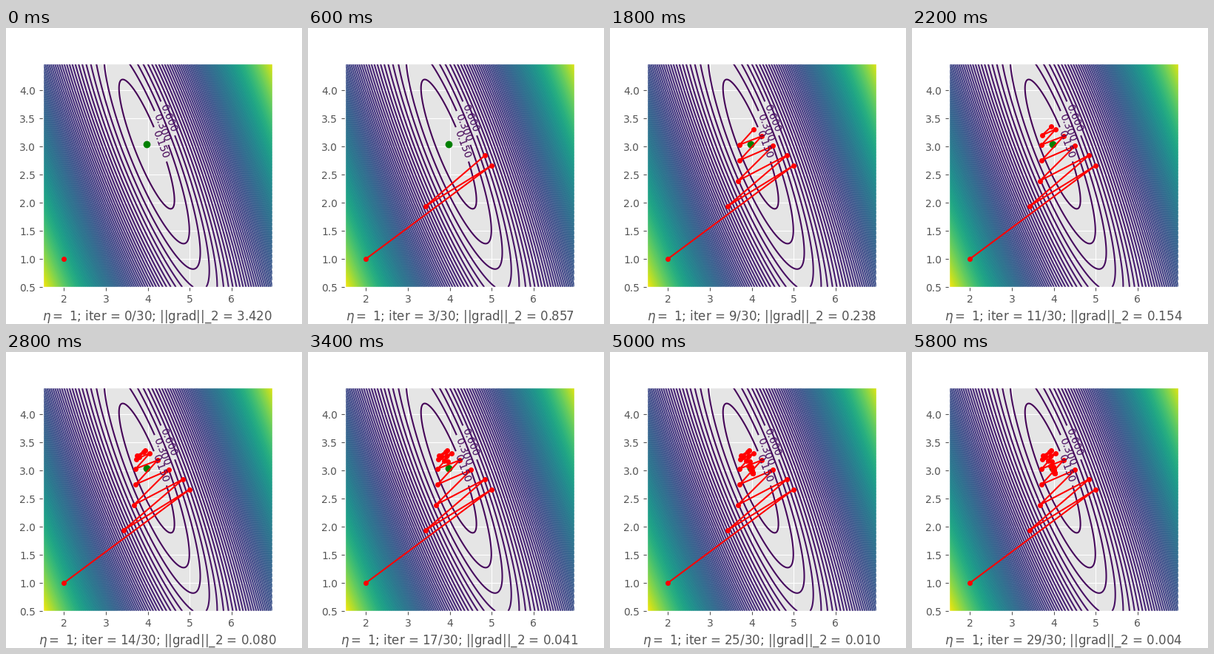
These frames come from a looping animation (400 by 400 pixels, 6 s). A matplotlib script:

```python
import numpy as np
import matplotlib.pyplot as plt
from matplotlib.animation import FuncAnimation

plt.style.use("ggplot")

ETA, GAMMA, STEPS = 1, 0.9, 30
START = np.array([2.0, 1.0])
BEST = np.array([3.9755, 3.041])
HESS = np.array([[1, 0.4976], [0.4976, 0.3306]])
NOISE = 0.04


def grad(w):
    return HESS @ (w - BEST)


def nesterov():
    path, v = [START], np.zeros(2)
    for _ in range(STEPS - 1):
        w = path[-1]
        v = GAMMA * v + ETA * grad(w - GAMMA * v)
        path.append(w - v)
    return np.array(path)


path = nesterov()
xs = np.arange(1.5, 7, 0.025)
ys = np.arange(0.5, 4.5, 0.025)
X, Y = np.meshgrid(xs, ys)
dx, dy = X - BEST[0], Y - BEST[1]
Z = NOISE + HESS[0, 0] * dx**2 + 2 * HESS[0, 1] * dx * dy + HESS[1, 1] * dy**2

fig, ax = plt.subplots(figsize=(4, 4), dpi=100)
fig.subplots_adjust(left=0.125, right=0.9, bottom=0.125, top=0.88)

curves = ax.contour(X, Y, Z, 100)
ax.clabel(curves, fontsize=10, fmt="%.3f",
          manual=[(4.31, 3.04), (4.33, 3.33), (4.49, 3.5)])
ax.plot(*BEST, "go")
trail, = ax.plot([], [], "r-o", markersize=4)
ax.set_xlim(xs[0], xs[-1])
ax.set_ylim(ys[0], ys[-1])


def update(k):
    trail.set_data(path[:k + 1, 0], path[:k + 1, 1])
    size = np.linalg.norm(grad(path[k]))
    ax.set_xlabel(rf"$\eta =$ {ETA}; iter = {k}/{STEPS}; ||grad||_2 = {size:.3f}")
    return trail,


anim = FuncAnimation(fig, update, frames=STEPS, interval=200, repeat=True, repeat_delay=0)
plt.show()
```
